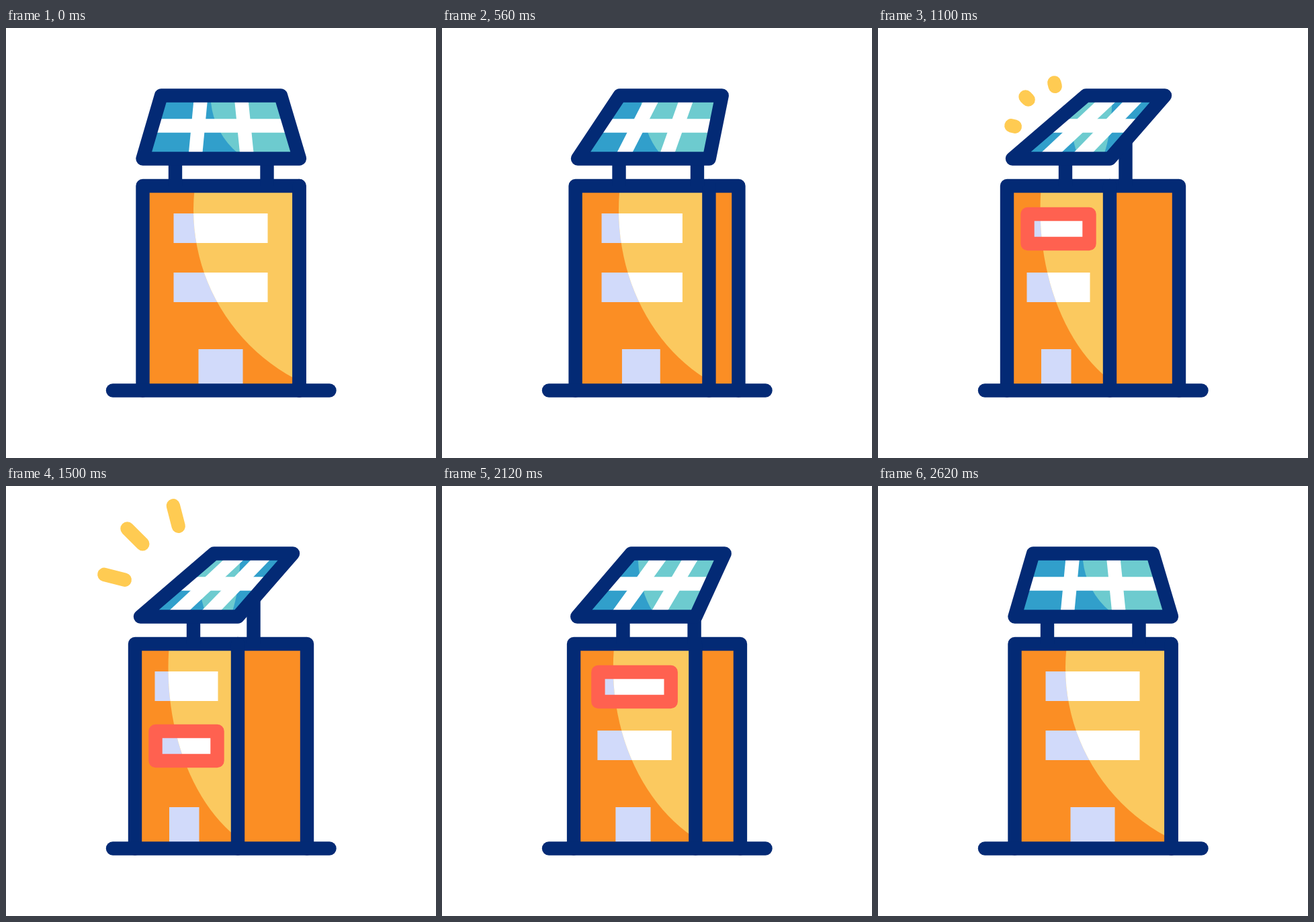
Recreate the animation shown at these times as an HTML page with a canvas. Size 640 by 640 pixels, loop 3000 ms.

```html
<!DOCTYPE html>
<html lang="en">
<head>
<meta charset="utf-8">
<title>Solar building</title>
<style>
  html, body { margin: 0; width: 100%; height: 100%; overflow: hidden; background: #fff; }
  canvas { display: block; width: 640px; height: 640px; }
</style>
</head>
<body>
<canvas width="640" height="640"></canvas>
<script>
const ctx = document.querySelector('canvas').getContext('2d');
const NAVY = '#032a75', ORANGE = '#fb8e24', YELLOW = '#fbc95f', LILAC = '#d1dafa',
      RED = '#ff6150', BLUE = '#319fcb', TEAL = '#6dcbcf', RAY = '#ffcb52', WHITE = '#fff';
const LOOP = 3000;

const clamp = u => Math.min(1, Math.max(0, u));
const smooth = u => (u = clamp(u), u * u * (3 - 2 * u));
const mix = (a, b, u) => a + (b - a) * u;

function trace(points, closed) {
  ctx.beginPath();
  points.forEach(([x, y]) => ctx.lineTo(x, y));
  if (closed) ctx.closePath();
}

function stroke(color, points, closed = false, cap = 'round') {
  trace(points, closed);
  ctx.lineCap = cap;
  ctx.strokeStyle = color;
  ctx.stroke();
}

function rect(color, x0, y0, x1, y1) {
  ctx.fillStyle = color;
  ctx.fillRect(x0, y0, x1 - x0, y1 - y0);
}

// Runs draw() inside the ellipse whose leftmost point is (x, y)
function insideEllipse(x, y, rx, ry, draw) {
  ctx.save();
  ctx.beginPath();
  ctx.ellipse(x + rx, y, rx, ry, 0, 0, 2 * Math.PI);
  ctx.clip();
  draw();
  ctx.restore();
}

function drawBuilding(p, litRow) {
  const left = 203.5 - 11.5 * p, edge = 436.5 - 91.5 * p, right = 436.5 + 11.5 * p;
  const winL = 249.5 - 28 * p, winR = 389.5 - 74 * p;
  const rows = [276, 364];
  const windows = color => rows.forEach(y => rect(color, winL, y, winR, y + 44));

  rect(ORANGE, left, 235, right, 539);
  windows(LILAC);
  insideEllipse(279 - 37.5 * p, 270.5, 285 - 94 * p, 285, () => {
    rect(YELLOW, left, 235, edge, 539);
    windows(WHITE);
  });
  rect(LILAC, 286.5 - 43.5 * p, 478, 352.5 - 65 * p, 539);

  if (litRow >= 0) {
    const y = rows[litRow] + 1, l = winL + 1, r = winR - 1;
    stroke(RED, [[l, y], [r, y], [r, y + 44], [l, y + 44]], true);
  }
  stroke(NAVY, [[left, 539.5], [left, 235], [right, 235], [right, 539.5]]);
  stroke(NAVY, [[edge, 235], [edge, 539.5]]);
  stroke(NAVY, [[159, 539.5], [481.5, 539.5]]);
}

function drawPanel(p) {
  const topL = 231 + 78.5 * p, topR = 409 + 18 * p;
  const botL = 203.5 - 3.5 * p, botR = 437 - 92 * p;
  const top = 100.5, bottom = 194.5;
  const outline = [[topL, top], [topR, top], [botR, bottom], [botL, bottom]];

  for (const x of [252 + 27 * p, 388.5 - 20 * p])
    stroke(NAVY, [[x, 165], [x, 235]], false, 'butt');

  ctx.save();
  trace(outline, true);
  ctx.clip();
  rect(BLUE, 180, top, 460, bottom);
  insideEllipse(304.5 - 20 * p, 100, 112 - 80 * p, 112,
    () => rect(TEAL, 180, top, 460, bottom));
  stroke(WHITE, [[180, 145.5], [460, 145.5]], false, 'butt');
  for (const u of [1 / 3, 2 / 3])
    stroke(WHITE, [[mix(topL, topR, u), top], [mix(botL, botR, u), bottom]], false, 'butt');
  ctx.restore();

  stroke(NAVY, outline, true);
}

function drawRays(t) {
  if (t < 1065 || t >= 1800) return;
  const far = 1 - (1 - clamp((t - 1065) / 765)) ** 2;
  const near = clamp((t - 1000) / 800) ** 2;
  // The outer rays mirror each other across the diagonal x - y = 117
  const steep = u => [mix(264, 245.4, u), mix(88, 16, u)];
  const flat = u => { const [x, y] = steep(u); return [y + 117, x - 117]; };
  const diagonal = u => [mix(224.5, 170.5, u), mix(107.5, 53.5, u)];
  for (const at of [steep, diagonal, flat]) stroke(RAY, [at(near), at(far)]);
}

function frame(now) {
  const t = now % LOOP;
  const turn = smooth((t - 200) / 800) - smooth((t - 1800) / 800);
  const blinking = t >= 1000 && t < 2610;
  const litRow = blinking ? Math.min(3, Math.floor((t - 1000) / 400)) % 2 : -1;

  rect(WHITE, 0, 0, 640, 640);
  ctx.lineWidth = 20.4;
  ctx.lineJoin = 'round';
  drawRays(t);
  drawBuilding(turn, litRow);
  drawPanel(turn);
  requestAnimationFrame(frame);
}
requestAnimationFrame(frame);
</script>
</body>
</html>
```
